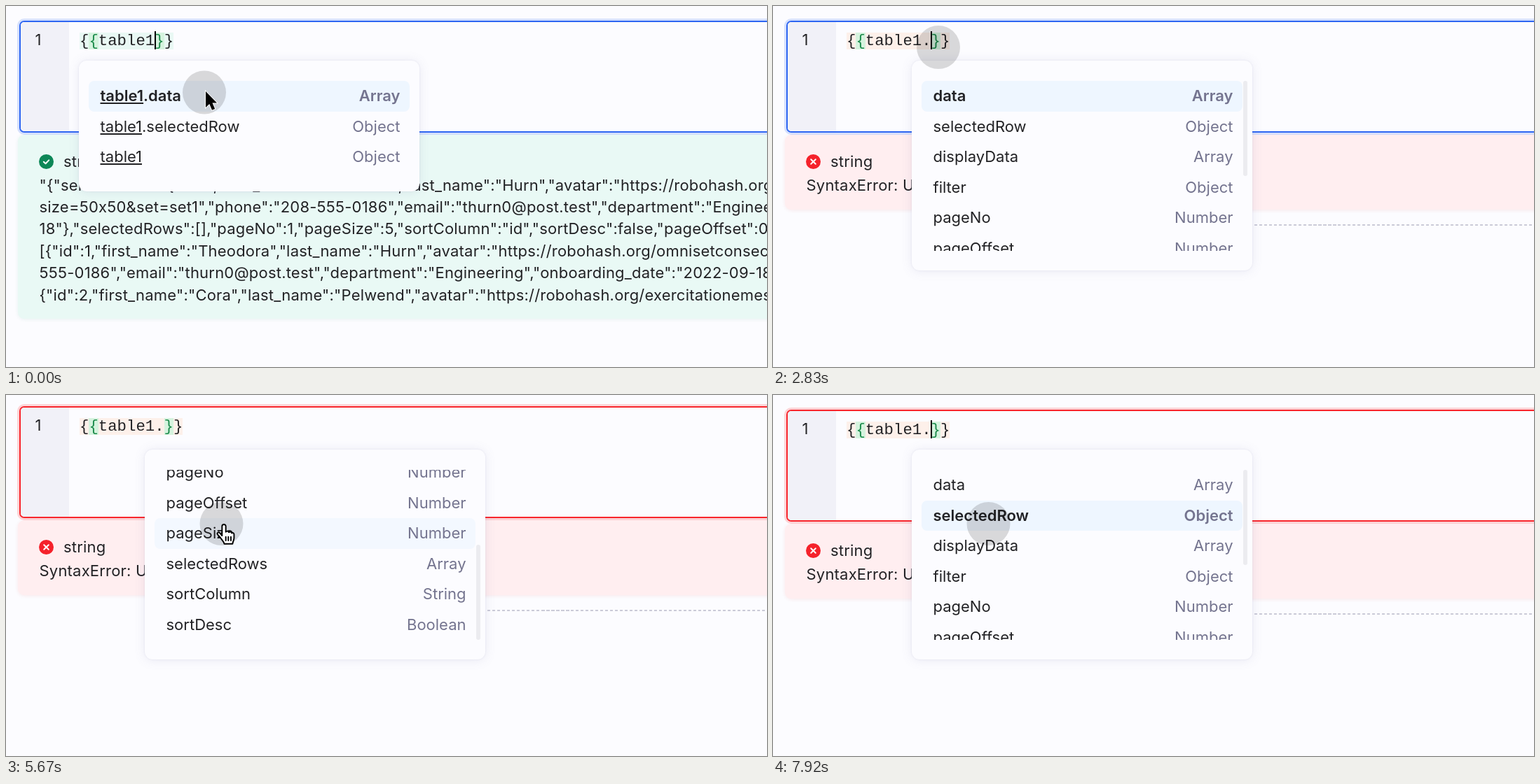
These frames come from a looping animation (1086x516 px, 8 s). An HTML page:

```html
<!DOCTYPE html>
<html lang="en">
<head>
<meta charset="utf-8">
<title>Code completion</title>
<style>
  html, body { margin: 0; width: 100%; height: 100%; overflow: hidden; background: #fcfcff; }
  body {
    position: relative; color: #222225;
    font: 22px/31.4px Inter, sans-serif; font-variant-ligatures: no-contextual;
  }
  div, svg { position: absolute; box-sizing: border-box; }
  [hidden] { display: none !important; }
  #page { inset: 0; white-space: pre; }
  #editor {
    left: 19px; top: 21px; width: 1100px; height: 160px; border-radius: 7px;
    border: 2px solid rgb(var(--tone)); box-shadow: 0 0 0 3px rgba(var(--tone), .19);
    overflow: hidden; background: #fcfcff;
  }
  #gutter { left: 0; top: 0; width: 69px; height: 100%; background: #f1f1f8; }
  #lineNo { left: 41.5px; top: 33px; }
  #code {
    left: 105px; top: 38px; height: 24px;
    font: 22.33px/25px "Liberation Mono", monospace; background: #e9f8f4;
  }
  #code span { display: inline-block; height: 24px; vertical-align: top; }
  #code .match { background: #d5f3de; color: #1b8a4a; }
  .bad #code { background: #fdf0ea; }
  #caret { top: 36px; width: 2px; height: 26px; background: #000; }
  #result {
    left: 17px; top: 184px; width: 1100px; height: 263px; border-radius: 9px; letter-spacing: .2px;
    background: #e9f9f5; box-shadow: 0 1px 5px rgba(60, 150, 120, .1);
  }
  .bad #result { height: 107px; background: #ffeef0; box-shadow: 0 1px 5px rgba(220, 60, 60, .1); }
  #kind { left: 65px; top: 23px; }
  #output { left: 30.5px; top: 56.5px; }
  #badge { left: 30px; top: 28px; fill: none; stroke: #fff; stroke-width: 2; stroke-linecap: round; stroke-linejoin: round; }
  #rule { left: 400px; right: 0; top: 312px; height: 1.5px; background: repeating-linear-gradient(90deg, #cbcbd8 0 4.5px, transparent 4.5px 7px); }
  .popup {
    top: 78px; width: 486px; border-radius: 11px; background: #fcfcff;
    box-shadow: 0 0 2px rgba(110, 110, 160, .16), 0 1px 16px rgba(110, 110, 160, .13);
  }
  #short { left: 104px; height: 187px; }
  #long { left: 198px; height: 300px; }
  .view { left: 14px; top: 29px; width: 470px; height: 243px; overflow: hidden; }
  .list { left: 0; top: 0; width: 458px; }
  .row {
    position: relative; display: flex; justify-content: space-between;
    height: 43.5px; line-height: 43.5px; padding: 0 13.5px 0 16.5px; border-radius: 8px; white-space: pre;
  }
  .row i { font-style: normal; color: #74748f; }
  .row.hover { background: #f3f8ff; }
  .row.active { background: #eef6ff; font-weight: 600; }
  u { text-decoration-thickness: 1.5px; text-underline-offset: 2px; }
  #thumb { left: 473px; top: 29px; width: 6px; height: 136px; border-radius: 3px; background: #ececf0; }
  #halo { left: -31px; top: -31px; width: 62px; height: 62px; border-radius: 50%; background: rgba(0, 0, 0, .145); }
  #arrow, #hand { left: 0; top: 0; overflow: visible; }
</style>
</head>
<body>
<div id="page">
  <div id="rule"></div>
  <div id="result">
    <svg id="badge" width="21" height="21">
      <circle id="dot" cx="10.5" cy="10.5" r="10.5" stroke="none"/>
      <path id="mark"/>
    </svg>
    <div id="kind">string</div>
    <div id="output"></div>
  </div>
  <div id="editor"><div id="gutter"></div></div>
  <div id="lineNo">1</div>
  <div id="code"><span>{</span><span class="match">{</span><span id="word"></span><span class="match">}</span><span>}</span></div>
  <div id="caret"></div>
</div>
<div id="short" class="popup"><div class="view"><div class="list" id="shortList"></div></div></div>
<div id="long" class="popup">
  <div class="view"><div class="list" id="longList"></div></div>
  <div id="thumb"></div>
</div>
<div id="halo"></div>
<svg id="arrow" width="1" height="1">
  <path transform="scale(.94)" d="M0 0V24.5L5.6 19.2L9.6 28.5L14 26.6L10.1 17.6H17Z" fill="#000" stroke="#fff" stroke-width="2" paint-order="stroke"/>
</svg>
<svg id="hand" width="1" height="1">
  <g transform="scale(1.07) translate(-10.5 -2)" stroke="#000" stroke-width="1.8" stroke-linecap="round" stroke-linejoin="round">
    <path fill="#fff" d="M8 17V4.5a2.5 2.5 0 0 1 5 0V12c1-1.5 3.6-1.3 4 .6 1-1.2 3.5-.8 3.8 1 1.2-1 3.2-.2 3.2 1.8V20c0 3-1.5 4.5-2 8H11c-.5-3-3-5-5-8l-4-4.5c-1.2-2 1.2-3.8 2.8-2.3z"/>
    <path d="M13 18.5v5M16.4 18.5v5M19.8 18.5v5"/>
  </g>
</svg>
<script>
const LOOP = 8000, FPS = 12, ROW = 43.5, VIEW_TOP = 107, MAX_SCROLL = 192;
const BLUE = [46, 102, 242], RED = [248, 38, 44];
const el = Object.fromEntries([...document.querySelectorAll('[id]')].map(e => [e.id, e]));

const OUTPUT = [
  '"{"selectedRow":{"id":1,"first_name":"Theodora","last_name":"Hurn","avatar":"https://robohash.org/omnisetconsectetur',
  'size=50x50&set=set1","phone":"208-555-0186","email":"thurn0@post.test","department":"Engineering",',
  '18"},"selectedRows":[],"pageNo":1,"pageSize":5,"sortColumn":"id","sortDesc":false,"pageOffset":0,"data":',
  '[{"id":1,"first_name":"Theodora","last_name":"Hurn","avatar":"https://robohash.org/omnisetconsectetur',
  '555-0186","email":"thurn0@post.test","department":"Engineering","onboarding_date":"2022-09-18"},',
  '{"id":2,"first_name":"Cora","last_name":"Pelwend","avatar":"https://robohash.org/exercitationemest'
].join('\n');
const ERROR = "SyntaxError: Unexpected token '}'";

const fill = (list, items) => {
  list.innerHTML = items.map(([name, type]) => `<div class="row"><span>${name}</span><i>${type}</i></div>`).join('');
  return [...list.children];
};
fill(el.shortList, [
  ['<u>table1</u>.data', 'Array'], ['<u>table1</u>.selectedRow', 'Object'], ['<u>table1</u>', 'Object']
])[0].classList.add('active');
const rows = fill(el.longList, [
  ['data', 'Array'], ['selectedRow', 'Object'], ['displayData', 'Array'], ['filter', 'Object'],
  ['pageNo', 'Number'], ['pageOffset', 'Number'], ['pageSize', 'Number'],
  ['selectedRows', 'Array'], ['sortColumn', 'String'], ['sortDesc', 'Boolean']
]);

// Tracks are [time, x, y] points joined by straight moves.
const HALO = [[1000, 283, 123.5], [1333, 255.5, 71], [1583, 213, 57.5], [1750, 210, 57.5], [1917, 210, 57.5],
  [2083, 236, 59], [3833, 236, 59], [4083, 288.5, 123.5], [4250, 304, 172], [4417, 307.5, 184]];
const ARROW = [[1000, 285, 122], [1333, 251, 71], [1500, 222, 59]];
const HAND = [[3917, 262, 92], [4083, 304, 148], [4250, 310, 181], [4417, 311, 185]];
const TOGGLES = [167, 667, 1167, 1583, 2083, 2667, 3333, 3917, 4417, 4917, 5417, 5917, 6417, 6917, 7417, 7917];

const ramp = (t, a, b) => Math.min(1, Math.max(0, (t - a) / (b - a)));
const ease = (t, a, b) => { const u = ramp(t, a, b); return u * u * (3 - 2 * u); };
const mix = (a, b, u) => a + (b - a) * u;
const within = (t, a, b) => t >= a && t < b;

function along(track, t) {
  const i = track.findIndex(p => p[0] > t);
  if (i === 0) return track[0].slice(1);
  if (i < 0) return track[track.length - 1].slice(1);
  const a = track[i - 1], b = track[i], u = ramp(t, a[0], b[0]);
  return [mix(a[1], b[1], u), mix(a[2], b[2], u)];
}
const place = (node, [x, y]) => { node.style.transform = `translate(${x}px, ${y}px)`; };

function draw(time) {
  // The picture advances in twelfths of a second; +1 absorbs rounding.
  const t = Math.floor((time + 4) * FPS / 1000) * 1000 / FPS + 1;
  const typed = t >= 2667, bad = t >= 2750;

  el.page.classList.toggle('bad', bad);
  el.word.textContent = typed ? 'table1.' : 'table1';
  el.caret.style.left = (typed ? 225 : 212) + 'px';
  el.caret.hidden = TOGGLES.filter(x => x <= t).length % 2 === 1;
  const alarm = ramp(t, 2920, 3250);
  el.editor.style.setProperty('--tone', BLUE.map((c, i) => Math.round(mix(c, RED[i], alarm))).join());
  el.output.textContent = bad ? ERROR : OUTPUT;
  el.dot.setAttribute('fill', bad ? '#f5222b' : '#0d8757');
  el.mark.setAttribute('d', bad ? 'M7.2 7.2l6.6 6.6M13.8 7.2l-6.6 6.6' : 'M6.8 10.7l2.7 2.6 4.7-4.9');

  const scroll = MAX_SCROLL * (ease(t, 4500, 5000) - ease(t, 5820, 6583));
  const lift = Math.round(6 * (ease(t, 5333, 5750) - ease(t, 5833, 6250)));
  place(el.page, [0, -lift]);
  place(el.longList, [0, -scroll]);
  place(el.thumb, [0, scroll * 107 / MAX_SCROLL]);
  el.short.hidden = t >= 1500;
  el.long.hidden = !bad;

  const hand = along(HAND, t), pointing = within(t, 3917, 7833);
  const hover = pointing ? Math.floor((hand[1] + 2 - VIEW_TOP + scroll) / ROW) : -1;
  const active = t >= 7833 ? 1 : 0;
  rows.forEach((row, i) => {
    row.classList.toggle('hover', i === hover);
    row.classList.toggle('active', i === active);
  });

  place(el.halo, along(HALO, t));
  place(el.arrow, along(ARROW, t));
  place(el.hand, hand);
  el.arrow.style.display = t < 1583 ? '' : 'none';
  el.hand.style.display = pointing ? '' : 'none';
}

function tick() {
  draw(performance.now() % LOOP);
  requestAnimationFrame(tick);
}
tick();
</script>
</body>
</html>
```
